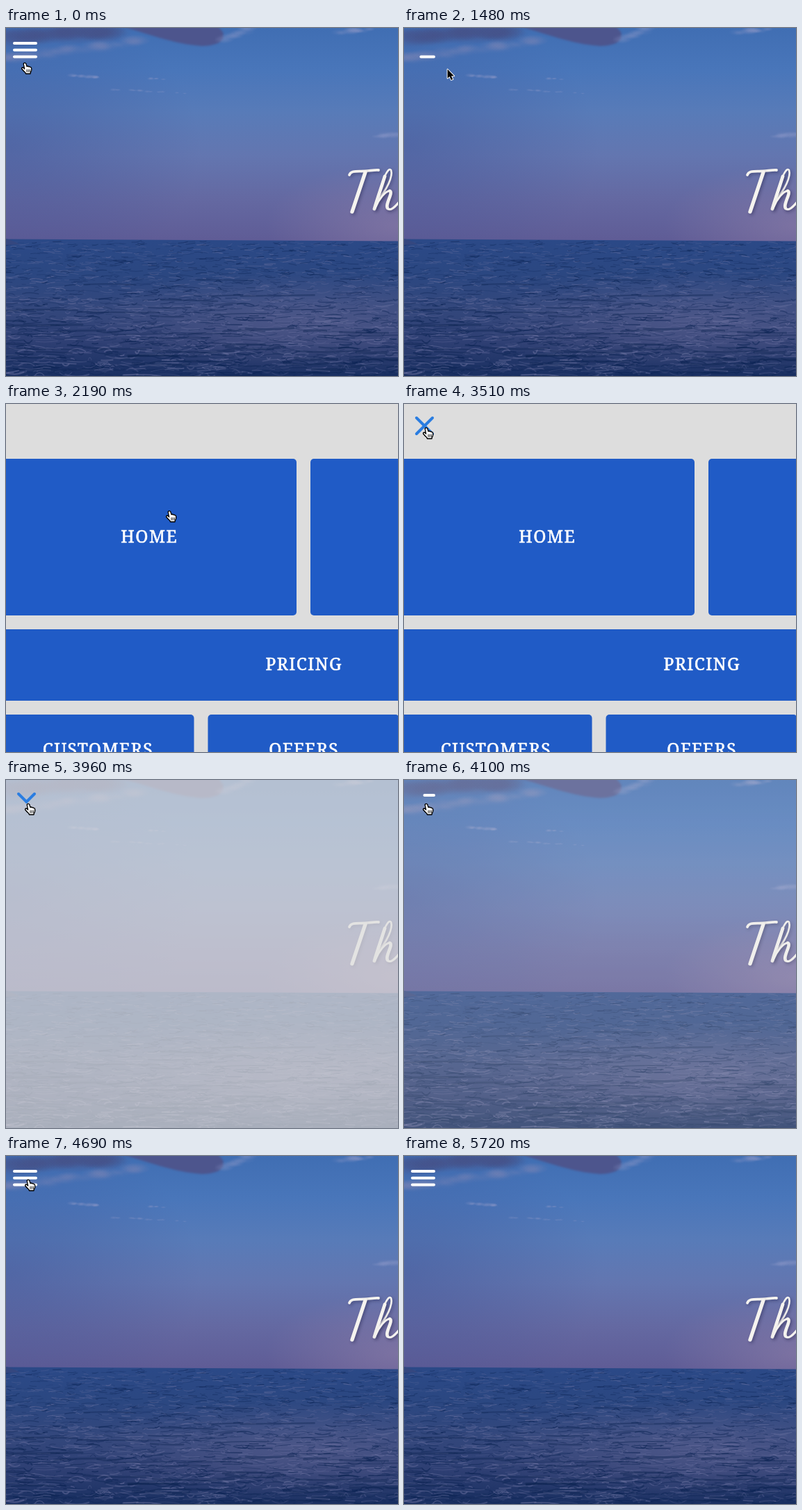
These frames come from a looping animation (564 by 502 pixels, 6170 ms). An HTML page with a canvas:

```html
<!DOCTYPE html>
<html lang="en">
<head>
<meta charset="utf-8">
<title>Sea menu</title>
<style>
html, body { margin: 0; width: 100%; height: 100%; overflow: hidden; background: #ddd; }
canvas { display: block; }
</style>
</head>
<body>
<canvas id="stage" width="564" height="502" role="img" aria-label="Th"></canvas>
<script>
const W = 564, H = 502, HORIZON = 306;
const LOOP = 6170, STEPS = 42, STEP = LOOP / STEPS;
const STALL = 11, RESUME = 15; // the picture freezes while the menu opens
const CLOSE = 27, EXIT = 39;
const ctx = document.getElementById('stage').getContext('2d');

// Pointer tip: step, x, y
const PATH = [
  [0, 27, 50], [4, 22, 36], [6, 22, 36], [10, 62, 59], [RESUME, 235, 154],
  [20, 235, 154], [24, 32, 34], [32, 32, 34], [34, 458, 358], [EXIT, 565, 520]
];

const HAND = new Path2D('M-1.7 2Q-1.7 .3 0 .3Q1.3 .3 1.8 1.6L3 5.6Q4.6 4.4 5.6 6Q7.2 5 8 6.8' +
  'Q9.4 6.2 9.6 8.2V11Q9.2 13 8.2 14L8 15.8H1.4L1 14.4Q-1.2 12.6-4.2 9Q-4.8 7.2-3 7.2Q-1.6 7.4-.3 9Z');
const CREASES = new Path2D('M3 10V13.4M5.2 10V13.4M7.4 10V13.4');
const ARROW = new Path2D('M.6 .6V13.6L3.6 10.9L5.9 15.9L8.2 15L6 10.2H10Z');

const ramp = (n, start, length) => Math.max(0, Math.min(1, (n - start) / length));
const mix = (a, b, k) => a + (b - a) * k;

function seeded(seed) {
  return () => (seed = (seed * 16807) % 2147483647) / 2147483647;
}
const rand = seeded(77);
const spread = size => (rand() + rand() - 1) * size;

function fade(c, y0, y1, colors) {
  const g = c.createLinearGradient(0, y0, 0, y1);
  colors.forEach((color, i) => g.addColorStop(i / (colors.length - 1), color));
  c.fillStyle = g;
}

function glow(c, x, y, rx, ry, rgb, alpha) {
  c.save();
  c.translate(x, y);
  c.scale(rx, ry);
  const g = c.createRadialGradient(0, 0, 0, 0, 0, 1);
  g.addColorStop(0, `rgba(${rgb},${alpha})`);
  g.addColorStop(1, `rgba(${rgb},0)`);
  c.fillStyle = g;
  c.fillRect(-1, -1, 2, 2);
  c.restore();
}

// Soft puffs scattered along a line
function cloud(c, x0, y0, x1, y1, thick, rgb, alpha, count) {
  for (let i = 0; i < count; i++) {
    const k = rand(), size = thick * mix(.5, 1.1, rand());
    glow(c, mix(x0, x1, k), mix(y0, y1, k) + spread(thick / 2), size * 2.6, size, rgb, alpha);
  }
}

function paintSky(c) {
  fade(c, 0, HORIZON, ['#406eb3', '#4976ba', '#587bb8', '#6376b0', '#6469a2', '#5f5c96']);
  c.fillRect(0, 0, W, HORIZON + 2);
  glow(c, 0, 170, 280, 210, '58,78,146', .4);
  glow(c, W, 285, 190, 90, '146,128,168', .55);

  cloud(c, 0, 44, 190, 18, 9, '118,130,182', .2, 45);
  cloud(c, 0, 12, 150, 4, 15, '70,82,138', .3, 45);
  c.filter = 'blur(1.5px)';
  c.fillStyle = '#4d558d';
  c.fill(new Path2D('M160 -4C205 8 240 23 282 26C305 25 316 19 312 6L304 -4Z'));
  c.filter = 'none';
  const wisp = '132,146,196';
  cloud(c, 310, 18, 350, 0, 6, wisp, .2, 16);
  cloud(c, 480, 6, 525, 2, 5, wisp, .25, 14);
  cloud(c, 95, 69, 142, 72, 3, wisp, .4, 12);
  cloud(c, 145, 88, 262, 94, 2.5, wisp, .4, 12);
  cloud(c, 204, 72, 228, 74, 2.5, wisp, .4, 5);
  cloud(c, 530, 157, 566, 152, 5, wisp, .35, 9);
}

// A ripple: nearer ones are longer and thicker
function ripple(c, depth, length, rgb, alpha, weight) {
  const x = rand() * (W + 80) - 60, y = HORIZON + 2 + depth * (H - HORIZON);
  c.strokeStyle = `rgba(${rgb},${alpha})`;
  c.lineWidth = weight;
  c.beginPath();
  c.moveTo(x, y);
  c.quadraticCurveTo(x + length / 2, y + spread(2 + 8 * depth), x + length, y + spread(3));
  c.stroke();
}

function paintSea(c) {
  c.save();
  c.beginPath();
  c.moveTo(0, HORIZON - 1.5);
  c.lineTo(W, HORIZON + 1.5);
  c.lineTo(W, H);
  c.lineTo(0, H);
  c.clip();
  fade(c, HORIZON, H, ['#2b4987', '#2b4781', '#33477c', '#2e3f73', '#192f61']);
  c.fillRect(0, HORIZON - 2, W, H);
  glow(c, 430, 425, 330, 75, '122,118,162', .38);
  c.lineCap = 'round';
  for (let i = 0; i < 2600; i++) {
    const d = rand(), light = rand() < .45;
    ripple(c, d, 4 + rand() * (10 + 26 * d), light ? '112,117,163' : '12,36,84',
      mix(.15, light ? .5 : .6, rand()), mix(.6, 1 + 1.3 * d, rand()));
  }
  for (let i = 0; i < 60; i++) {
    const d = mix(.25, 1, Math.sqrt(rand()));
    ripple(c, d, mix(30, 120, rand()), '12,34,80', .38, 1 + 4 * d * rand());
  }
  c.restore();
  c.fillStyle = '#34477f';
  c.fill(new Path2D('M0 304Q8 306 20 312L0 313Z'));
}

function paintTitle(c) {
  c.save();
  c.strokeStyle = '#f5f3ef';
  c.lineCap = c.lineJoin = 'round';
  c.shadowColor = 'rgba(35,35,75,.45)';
  c.shadowBlur = 4;
  c.shadowOffsetX = c.shadowOffsetY = 2;
  const pen = (width, d) => {
    c.lineWidth = width;
    c.stroke(new Path2D(d));
  };
  pen(3.8, 'M494 212C496 205 506 207 516 206.5C524 206 530 204.5 536 205');
  pen(5.4, 'M517 208C511 226 504 247 498 265');
  pen(2.6, 'M534 248C548 234 557 214 554 205C551 201 546 210 542 222');
  pen(4.8, 'M545 214C540 230 534 247 530 261');
  pen(3, 'M531 260C536 247 546 235 552 235');
  pen(4.6, 'M552 235C558 237 545 254 549 260');
  pen(3.2, 'M549 260C553 265 560 258 567 249');
  c.restore();
}

function makeScene() {
  const layer = document.createElement('canvas');
  layer.width = W;
  layer.height = H;
  const c = layer.getContext('2d');
  paintSky(c);
  paintSea(c);
  paintTitle(c);
  return layer;
}

function tile(x, y, w, h, text) {
  ctx.fillStyle = '#205bc6';
  ctx.beginPath();
  ctx.roundRect(x, y, w, h, 5);
  ctx.fill();
  ctx.fillStyle = ctx.strokeStyle = '#fff';
  ctx.lineWidth = .6;
  const cx = x + w / 2 + .75, baseline = y + h / 2 + 7.5;
  ctx.fillText(text, cx, baseline);
  ctx.strokeText(text, cx, baseline);
}

function drawTiles() {
  ctx.font = '500 24.5px "Noto Serif", serif';
  ctx.letterSpacing = '1.5px';
  ctx.textAlign = 'center';
  tile(-7, 79, 425, 226, 'HOME');
  tile(438, 79, 425, 226, '');
  tile(-7, 325, 870, 103, 'PRICING');
  tile(-7, 448, 277.5, 103, 'CUSTOMERS');
  tile(290.5, 448, 275, 103, 'OFFERS');
}

function line(x0, y0, x1, y1, color) {
  ctx.strokeStyle = color;
  ctx.lineWidth = 4;
  ctx.lineCap = 'round';
  ctx.beginPath();
  ctx.moveTo(x0, y0);
  ctx.lineTo(x1, y1);
  ctx.stroke();
}

// Bars shrink to, and grow from, their right ends one after another.
function drawBars(n) {
  for (let i = 0; i < 3; i++) {
    const y = 22 + 9.75 * i, lag = 1.36 * i;
    const size = 1 - ramp(n, 6.76 + lag, 1.46) + ramp(n, 27.25 + lag, 1.5);
    if (size > .03) line(Math.min(43, 47 - 35 * size), y, 43, y, '#fff');
  }
}

function drawCross(n) {
  for (let i = 0; i < 2; i++) {
    const size = ramp(n, 15.1 + 1.3 * i, 1.4) - ramp(n, 26.5, 1);
    const x0 = i ? 41 : 18, x1 = 59 - x0;
    if (size > 0) line(x0, 20, mix(x0, x1, size), 20 + 23 * size, '#2a7de1');
  }
}

function drawPointer(n, menuOpen) {
  if (n >= EXIT) return;
  const i = PATH.findIndex(p => p[0] > n);
  const [n0, x0, y0] = PATH[i - 1], [n1, x1, y1] = PATH[i];
  const k = ramp(n, n0, n1 - n0);
  const x = Math.round(mix(x0, x1, k)), y = Math.round(mix(y0, y1, k));
  const overLink = (x < 50 && y < 52) || (menuOpen && y > 79);
  const shape = overLink ? HAND : ARROW;
  ctx.save();
  ctx.translate(x, y);
  ctx.lineJoin = 'round';
  ctx.lineWidth = overLink ? 1.2 : 2;
  ctx.strokeStyle = overLink ? '#000' : '#fff';
  ctx.fillStyle = overLink ? '#fff' : '#000';
  ctx.stroke(shape);
  ctx.fill(shape);
  if (overLink) {
    ctx.stroke(shape);
    ctx.lineWidth = .9;
    ctx.stroke(CREASES);
  }
  ctx.restore();
}

const scene = makeScene();

function draw(n) {
  const veil = ramp(n, 10.6, .8) - ramp(n, 26.5, 1.9);
  const menuOpen = n >= RESUME && n < CLOSE;
  ctx.drawImage(scene, 0, 0);
  ctx.fillStyle = `rgba(221,221,221,${veil})`;
  ctx.fillRect(0, 0, W, H);
  if (menuOpen) drawTiles();
  drawBars(n);
  drawCross(n);
  drawPointer(n, menuOpen);
}

const begin = performance.now();
function tick() {
  const t = (performance.now() - begin) % LOOP;
  const n = Math.floor((t + 24) / STEP) % STEPS;
  draw(n > STALL && n < RESUME ? STALL : n);
  requestAnimationFrame(tick);
}
tick();
</script>
</body>
</html>
```
